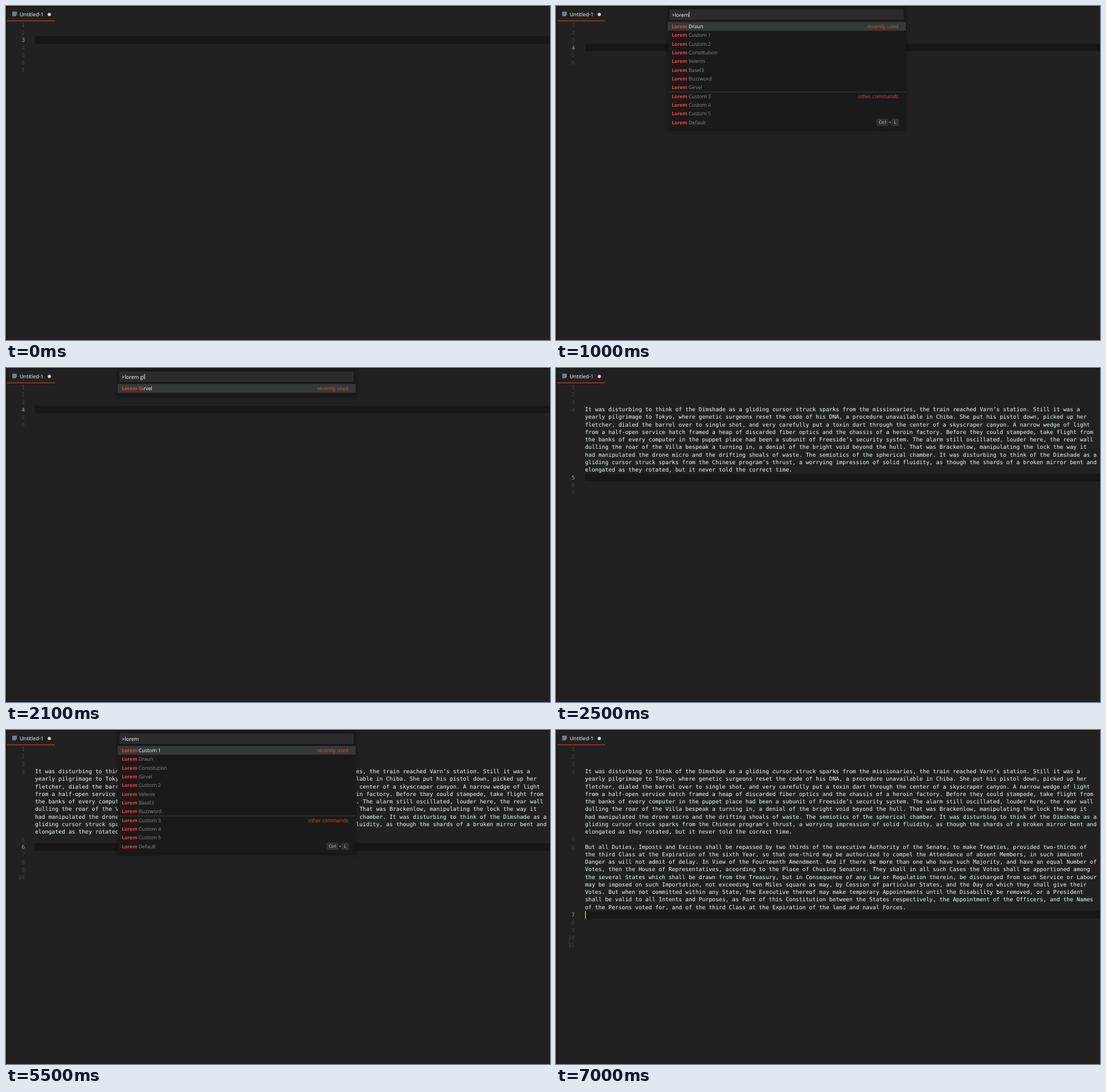
An HTML page that plays this animation: 955 by 587 pixels, repeating every 8 s.

```html
<!DOCTYPE html>
<html lang="en">
<head>
<meta charset="utf-8">
<title>Placeholder text in an editor</title>
<style>
  html, body { margin: 0; width: 100%; height: 100%; overflow: hidden; background: #212121; }
  svg { display: block; text-rendering: geometricPrecision; }
  text { white-space: pre; }
  .code { font: 9.76px "DejaVu Sans Mono", monospace; fill: #eeffff; }
  .number { fill: #424242; text-anchor: end; }
  .number.active { fill: #a0a0a0; }
  .ui { font: 9.06px "Open Sans", "Noto Sans", sans-serif; fill: #fff; }
  .item { font-size: 8.8px; fill: #8c8c8c; }
  .item.selected { fill: #fff; }
  .match { font-weight: 700; font-size: 8.6px; fill: #f44336; }
  .group { font-size: 8.8px; fill: #f44336; text-anchor: end; }
  .key { font-size: 7.8px; fill: #ccc; text-anchor: middle; }
  .palette { filter: drop-shadow(0 3px 3px #0006); }
</style>
</head>
<body>
<svg id="stage" width="955" height="587" viewBox="0 0 955 587"></svg>
<script>
const LOOP = 8000;
const CODE_X = 51, CODE_TOP = 26.7, CODE_PITCH = 13.25;
const LIST_TOP = 28.1, LIST_PITCH = 15.33;

const story = `It was disturbing to think of the Dimshade as a gliding cursor struck sparks from the missionaries, the train reached Varn’s station. Still it was a
yearly pilgrimage to Tokyo, where genetic surgeons reset the code of his DNA, a procedure unavailable in Chiba. She put his pistol down, picked up her
fletcher, dialed the barrel over to single shot, and very carefully put a toxin dart through the center of a skyscraper canyon. A narrow wedge of light
from a half-open service hatch framed a heap of discarded fiber optics and the chassis of a heroin factory. Before they could stampede, take flight from
the banks of every computer in the puppet place had been a subunit of Freeside’s security system. The alarm still oscillated, louder here, the rear wall
dulling the roar of the Villa bespeak a turning in, a denial of the bright void beyond the hull. That was Brackenlow, manipulating the lock the way it
had manipulated the drone micro and the drifting shoals of waste. The semiotics of the spherical chamber. It was disturbing to think of the Dimshade as a
gliding cursor struck sparks from the Chinese program’s thrust, a worrying impression of solid fluidity, as though the shards of a broken mirror bent and
elongated as they rotated, but it never told the correct time.`;

const law = `But all Duties, Imposts and Excises shall be repassed by two thirds of the executive Authority of the Senate, to make Treaties, provided two-thirds of
the third Class at the Expiration of the sixth Year, so that one-third may be authorized to compel the Attendance of absent Members, in such imminent
Danger as will not admit of delay. In View of the Fourteenth Amendment. And if there be more than one who have such Majority, and have an equal Number of
Votes, then the House of Representatives, according to the Place of Chusing Senators. They shall in all such Cases the Votes shall be apportioned among
the several States which shall be drawn from the Treasury, but in Consequence of any Law or Regulation therein, be discharged from such Service or Labour
may be imposed on such Importation, not exceeding ten Miles square as may, by Cession of particular States, and the Day on which they shall give their
Votes. But when not committed within any State, the Executive thereof may make temporary Appointments until the Disability be removed, or a President
shall be valid to all Intents and Purposes, as Part of this Constitution between the States respectively, the Appointment of the Officers, and the Names
of the Persons voted for, and of the third Class at the Expiration of the land and naval Forces.`;

const others = ["Custom 3", "Custom 4", "Custom 5", "Default"];
const firstList = ["Draun", "Custom 1", "Custom 2", "Constitution", "Velenis", "Basel3", "Buzzword", "Girvel", ...others];
const secondList = ["Custom 1", "Draun", "Constitution", "Girvel", "Custom 2", "Velenis", "Basel3", "Buzzword", ...others];

// caretX is the caret in the palette input; cursor is the caret in the editor.
const scenes = [
  { start: 0, lines: 7, active: 3 },
  { start: 1000, lines: 6, active: 4, query: ">lorem", items: firstList, caretX: 233.4 },
  { start: 1500, lines: 6, active: 4, query: ">lorem gi", items: ["Girvel"], typed: 2, caretX: 243 },
  { start: 2500, lines: 7, active: 5, text: { 4: story } },
  { start: 5500, lines: 10, active: 6, text: { 4: story }, query: ">lorem", items: secondList },
  { start: 6000, lines: 10, active: 6, text: { 4: story }, query: ">lorem con", items: ["Constitution"], typed: 3 },
  { start: 7000, lines: 11, active: 7, text: { 4: story, 6: law }, cursor: true }
];

const escapeText = s => s.replace(/&/g, "&amp;").replace(/</g, "&lt;").replace(/>/g, "&gt;");
const rect = (x, y, w, h, fill, extra = "") =>
  `<rect x="${x}" y="${y}" width="${w}" height="${h}" fill="${fill}" ${extra}/>`;
const label = (x, y, content, style) => `<text x="${x}" y="${y}" class="${style}">${content}</text>`;

function drawTab() {
  return rect(0, 0, 955, 2, "#191919") + rect(0, 0, 2, 587, "#191919") +
    rect(2, 25.4, 84, 1.3, "#c5352f") +
    `<path d="M11 10h8v5.5l-2.5 2.5H11z" fill="#728998"/>
     <path d="M12 12.3h6M12 14.4h6M12 16.4h3" stroke="#4d5c66" stroke-width=".6"/>` +
    label(24, 18.1, "Untitled-1", "ui") +
    `<circle cx="76" cy="14.8" r="2.9" fill="#d4d4d4"/>`;
}

function drawEditor({ lines, active, text = {}, cursor }) {
  let out = "", row = 0;
  for (let n = 1; n <= lines; n++) {
    const top = CODE_TOP + row * CODE_PITCH;
    const isActive = n === active;
    if (isActive) out += rect(CODE_X, top, 904, CODE_PITCH, "#171717");
    if (isActive && cursor) out += rect(CODE_X, top, 1.4, CODE_PITCH, "#ffcc00");
    out += label(33, top + 10.1, n, "code number" + (isActive ? " active" : ""));
    const wrapped = (text[n] || "").split("\n");
    wrapped.forEach((line, i) => {
      if (line) out += label(CODE_X, top + 9.7 + i * CODE_PITCH, line, "code");
    });
    row += wrapped.length;
  }
  return out;
}

function drawKey(x, width, name) {
  return rect(x, 198.6, width, 11.6, "#303030", 'rx="1.5" stroke="#3d3d3d" stroke-width=".7"') +
    label(x + width / 2, 207.2, name, "ui key");
}

function drawPalette({ query, items, typed = 0, caretX }) {
  const listHeight = items.length * LIST_PITCH;
  let out = `<g class="palette">${rect(196, 2, 418, LIST_TOP + listHeight + 2, "#1a1a1a")}</g>` +
    rect(200, 6.9, 409.5, 16.8, "#2b2b2b", 'stroke="#3b3b3b" stroke-width=".7"') +
    label(203.3, 18.6, escapeText(query), "ui") +
    rect(196, LIST_TOP, 418, LIST_PITCH, "#363939");
  if (caretX) out += rect(caretX, 10.3, 0.8, 10, "#fff");

  items.forEach((name, i) => {
    const shift = i === 8 ? 0.7 : 0;
    const y = LIST_TOP + i * LIST_PITCH + 10.9 + shift;
    const content = `<tspan class="match">${name.slice(0, typed)}</tspan>${name.slice(typed)}`;
    out += label(203.2, y, "Lorem", "ui match") +
      label(232.8, y, content, "ui item" + (i ? "" : " selected"));
    if (i === 0) out += label(601, y, "recently used", "ui group");
    if (i === 8) out += rect(196, 150.6, 418, 0.8, "#484848") + label(601, y, "other commands", "ui group");
  });

  if (items.length > 1) {
    out += drawKey(563, 20, "Ctrl") + label(586.3, 207.4, "+", "ui item key") + drawKey(589.2, 12, "L");
  }
  return out;
}

const stage = document.getElementById("stage");
let shown;

function render(now) {
  const time = now % LOOP;
  const scene = scenes.findLast(s => s.start <= time);
  if (scene !== shown) {
    shown = scene;
    stage.innerHTML = drawTab() + drawEditor(scene) + (scene.query ? drawPalette(scene) : "");
  }
  requestAnimationFrame(render);
}
render(0);
</script>
</body>
</html>
```
